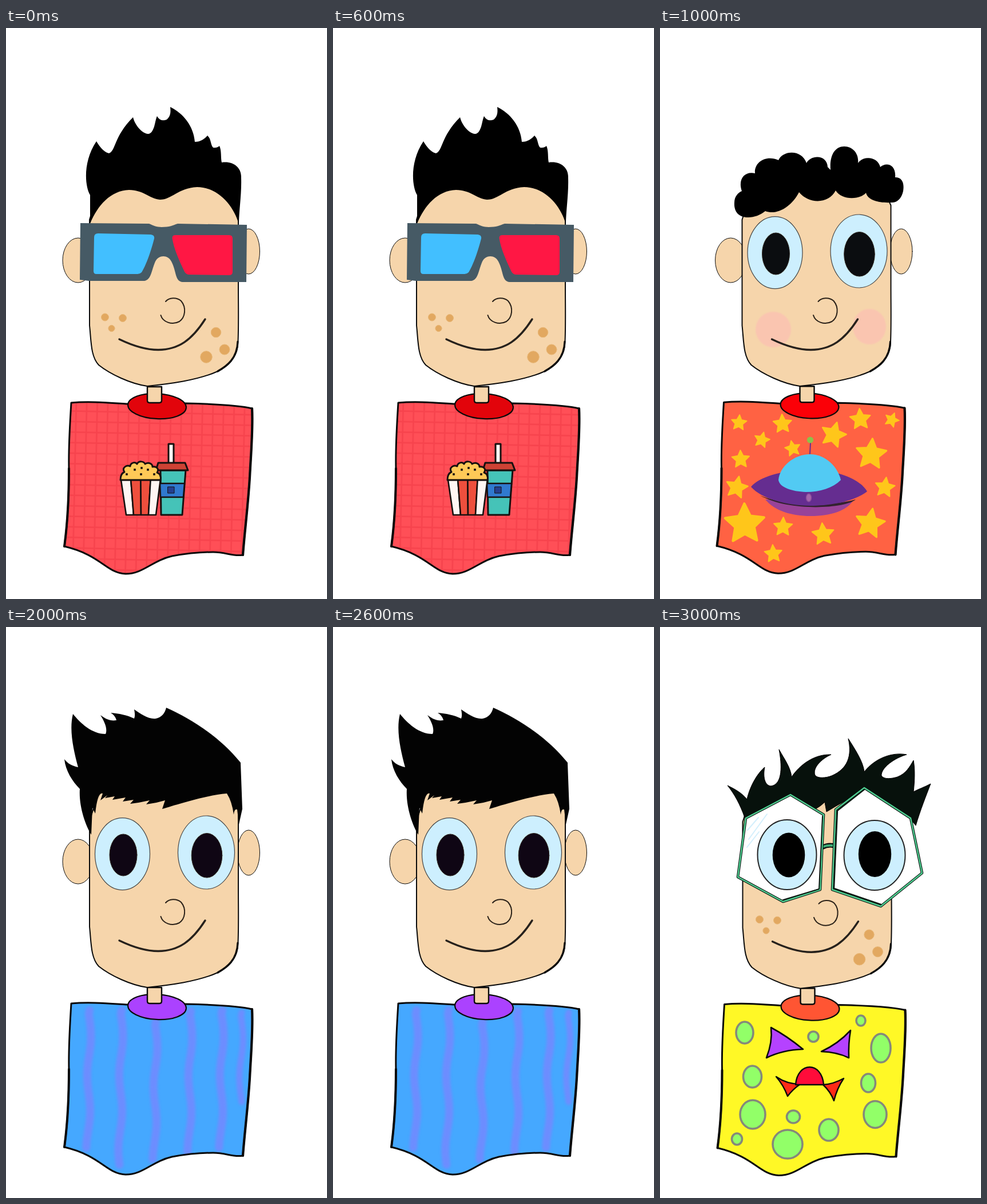
Recreate the animation shown at these times as an HTML page. Size 561 by 998 pixels, loop 4 s.

```html
<!DOCTYPE html>
<html lang="en">
<head>
<meta charset="utf-8">
<title>Four looks</title>
<style>
  html, body { margin: 0; width: 100%; height: 100%; overflow: hidden; background: #fff; }
  svg { display: block; width: 100%; height: 100%; }
</style>
</head>
<body>
<svg id="stage" viewBox="0 0 561 998" stroke-linejoin="round" stroke-linecap="round"></svg>
<script>
const STEP = 1000;
const SKIN = '#f6d5ab', INK = '#0a0a0a';

const path = (d, fill, stroke = 'none', w = 1) =>
  `<path d="${d}" fill="${fill}" stroke="${stroke}" stroke-width="${w}"/>`;
const oval = (x, y, rx, ry, fill, stroke = 'none', w = 1) =>
  `<ellipse cx="${x}" cy="${y}" rx="${rx}" ry="${ry}" fill="${fill}" stroke="${stroke}" stroke-width="${w}"/>`;
const move = (x, y, body) => `<g transform="translate(${x} ${y})">${body}</g>`;

const SHIRT = 'M114 655C145 652 180 655 213 657L315 656C355 657 405 659 430 665' +
  'C432 700 428 745 426 785C423 835 417 880 414 921C396 924 385 916 362 916C338 916 312 919 290 923' +
  'C255 931 240 954 209 954C176 953 166 921 102 906C108 862 110 815 110 770C109 730 112 690 114 655Z';
const HEAD = 'M146 335L165 275H390L406 310V450C406 490 407 530 405 556C402 580 385 592 370 600' +
  'C335 616 285 622 247 626C218 622 182 605 162 589C148 574 149 548 146 520Z';

function star(x, y, r, turn) {
  const pts = Array.from({ length: 10 }, (_, i) => {
    const a = (turn - 90 + i * 36) * Math.PI / 180, k = (i % 2 ? 0.46 : 0.94) * r;
    return (x + k * Math.cos(a)).toFixed(1) + ' ' + (y + k * Math.sin(a)).toFixed(1);
  });
  return path('M' + pts.join('L') + 'Z', '#ffc61a', '#ffc61a', r / 9);
}

const eyes = pupil =>
  oval(203.5, 392.6, 48, 63, '#cdeffe', '#444', 1.2) + oval(205, 394.5, 24, 36.5, pupil, '#332a22', 1) +
  oval(350, 390, 49.5, 64, '#cdeffe', '#444', 1.2) + oval(351, 395.3, 26.8, 38.8, pupil, '#332a22', 1);

const freckles = dx =>
  [[173 + dx, 505.5, 6.5], [204 + dx, 507, 6.5], [184.5 + dx, 525, 5.6], [367, 532, 8.7], [382, 562, 9], [350, 575, 10.3]]
    .map(([x, y, r]) => oval(x, y, r, r, '#e2a860', '#e8b675', 1)).join('');

const cheeks = `<g filter="url(#soft)">${oval(200.5, 527, 31, 31, '#fac5b0')}${oval(368.5, 522, 29, 31, '#fac5b0')}</g>`;

const ears = oval(126, 406, 27, 39, SKIN, INK, 1) + oval(424, 390.5, 19.5, 39.5, SKIN, INK, 1);

const features =
  path('M279 478C285 471 298 470 306 477C316 489 313 506 303 513C290 520 274 514 270.5 502', 'none', '#2a2118', 2) +
  path('M198 544C225 557 245 562.5 266 562.5C302 562 325 545 348 509', 'none', '#26211c', 3.4);

const neck = path('M247 627H272V651Q272 655 268 655H251Q247 655 247 651Z', SKIN, INK, 2.4);

// Popcorn tub and drink
function snack() {
  const tub = [0, 1, 2, 3].map(i => {
    const t = 201 + i * 17.2, b = 210 + i * 13;
    return path(`M${t} 790H${t + 17.2}L${b + 13} 851H${b}Z`, i % 3 ? '#ee4f3d' : '#fff6f4', '#17100f', 2.6);
  }).join('');
  const bits = [[211, 780], [225, 772], [236, 780], [237, 769], [248, 772], [259, 780]]
    .map(([x, y]) => `<rect x="${x - 1.8}" y="${y - 1.8}" width="3.6" height="3.6" fill="#17100f"/>`).join('');
  return path('M284 760V727H293V760', '#fff6f4', '#17100f', 3) +
    path('M270 773H314L308 851H271Z', '#45c3b8', '#17100f', 3) +
    path('M269 796H312L310 820H270Z', '#3079cf', '#17100f', 2.6) +
    `<rect x="283" y="802" width="11" height="11" fill="#243f8f" stroke="#17100f"/>` +
    path('M266 760H313L318 773H262Z', '#cf4234', '#17100f', 3) + tub +
    path('M200 790C200 782 202 778 207 776C202 769 210 763 217 766C218 759 226 758 229 762' +
      'C232 756 241 757 243 762C250 758 256 762 256 767C264 766 268 771 264 777C270 779 271 785 270 790Z',
      '#ffc957', '#17100f', 3) + bits;
}

const grid = '<rect x="90" y="640" width="350" height="330" fill="url(#grid)"/>';

const saucer =
  path('M184 824C200 844 230 853 263 853C300 853 325 843 336 828Z', '#984399') +
  path('M175 817C220 836 300 836 342 824C325 840 225 846 175 817Z', '#33222f') +
  path('M159 802C175 782 225 771 262 774C310 771 350 789 362 810C340 827 300 835 262 835C220 834 178 823 159 802Z', '#652d90') +
  path('M207 790C209 766 235 745 262 745C290 745 311 768 316 790C302 804 280 811 255 811C230 810 209 803 207 790Z', '#52caf3') +
  path('M262 744L263 725', 'none', '#652d90', 2) + oval(262.5, 720, 5.6, 5.6, '#8bc34a') +
  oval(260, 821, 4.5, 7, '#a566ab', '#8a4d9b', 1.5);

const starry = [
  [138, 690, 15, 5], [214, 692, 18, -3], [178, 720, 15, 14], [232, 735, 15, -12], [303, 711, 24, 16],
  [350, 684, 20, -4], [405, 685, 14, 22], [369, 745, 29, 5], [141, 754, 17, -2], [134, 803, 21, 12],
  [393, 803, 19, 8], [148, 867, 38, -1], [215, 872, 18, 2], [285, 885, 21, -5], [367, 866, 28, 10], [198, 919, 17, -4]
].map(s => star(...s)).join('');

const stripes = `<g filter="url(#blur)" opacity=".75">` +
  [[146, 670, 912], [202, 670, 940], [262, 690, 930], [323, 672, 922], [378, 670, 914], [412, 674, 830]]
    .map(([x, a, b]) => {
      let d = `M${x} ${a}`;
      for (let y = a + 6; y <= b; y += 6)
        d += `L${(x - (y - a) / 90 + 3 * Math.sin((y - a) / 20.7 - 0.7)).toFixed(1)} ${y}`;
      return path(d, 'none', '#7a85ff', x > 400 ? 11 : 14);
    }).join('') + '</g>';

const spots = [
  [148, 709, 15, 19], [268, 716, 9, 9], [351, 688, 8, 9], [386, 736, 17, 25], [161.5, 786, 16, 19],
  [364, 797, 12.5, 16], [162, 852, 22, 25], [376, 852, 20, 23.5], [233, 856, 11.5, 11],
  [134.5, 895, 9, 10], [295, 879, 17, 19], [223, 904, 26, 25]
].map(s => oval(...s, '#92ff68', '#85897a', 3.6)).join('');

const monster =
  path('M194 700Q222 715 250 738Q215 739 186 753Q197 725 194 700Z', '#b542ff', INK, 2.6) +
  path('M333 705Q312 728 282 742Q310 743 330 753Q329 728 333 705Z', '#b542ff', INK, 2.6) +
  path('M203 786Q222 799 245 799Q232 808 223 820Q216 801 203 786Z', '#ff2a17', INK, 2.4) +
  path('M321 789Q303 799 285 800Q298 812 304 828Q309 807 321 789Z', '#ff2a17', INK, 2.4) +
  path('M237 800C240 759 283 759 286 800Z', '#ff0c3a', INK, 2.4);

const spiky = path('M147 342L147 292C137 275 135 232 158 198C164 208 171 217 180 219C192 215 188 190 222 156' +
  'C226 172 240 186 250 185C260 181 260 163 264 154C269 163 276 162 281 160C288 154 288 146 287 138' +
  'C310 149 328 172 330 199C340 199 347 194 352 188C359 194 357 204 362 209C367 210 371 208 373 206' +
  'C377 215 375 226 377 235C396 232 412 243 411 262C412 290 407 320 407 343C398 310 370 278 334 278' +
  'C300 280 290 300 269 300C250 298 240 283 215 283C183 284 160 310 147 342Z', '#000');

const curly = path('M154 331C135 331 129 318 130 305C130 295 136 288 143 285C136 265 147 250 166 254' +
  'C164 235 185 221 207 231C215 213 248 212 256 236C264 221 292 221 293 243L298 248C296 222 306 207 322 207' +
  'C338 207 348 221 346 236C355 223 380 224 385 243C395 234 413 238 411 261C424 261 427 272 425 285' +
  'C422 300 412 306 404 305C385 306 363 302 360 288C350 300 318 302 307 284C295 308 260 308 243 287' +
  'C230 312 205 328 184 320C175 327 165 331 154 331Z', '#000');

const swept = path('M149 363C138 345 127 312 129 283C116 270 104 251 102 231C108 239 116 243 126 245' +
  'C118 215 110 180 117 152C130 168 150 187 174 187C178 178 172 165 165 154C173 160 182 165 193 163' +
  'C192 158 188 153 183 150C197 151 212 154 224 160C226 155 225 150 224 144C235 152 250 162 262 160' +
  'C272 158 278 150 280 141C322 160 372 190 410 237L413 318L407 345L404 319Q399 317 398 328Q395 305 386 291' +
  'C350 294 300 310 273 318L278 303Q262 308 245 310L251 303Q234 307 217 309L223 302L204 305L209 298' +
  'L186 302L190 296L173 299L177 294L165 303L169 291Q160 288 156 326L151 316Z', '#030303');

const flames = path('M148 333C140 310 130 292 118 277C130 283 142 289 152 301C158 275 172 254 183 245' +
  'C180 260 182 277 194 278C215 275 213 240 208 214C218 232 228 245 230 262C245 240 270 222 299 223' +
  'C283 230 266 246 271 259C275 265 290 264 300 260C328 248 336 225 329 195C341 214 355 235 357 253' +
  'C375 230 405 218 431 223C410 229 386 246 387 260C392 267 405 265 415 262C430 256 436 245 443 233' +
  'C446 250 445 270 443 288C452 283 462 280 473 274C465 295 455 320 447 347L438 336L357 285L306 314' +
  'L291 323L288 306Q281 313 272 318L228 293Z', '#07110c', '#000', 1);

const shades = path('M130 341L250 342C257 345 263 348 272 348C286 348 291 345 300 342L421 344L420 444L308 444' +
  'C295 442 298 425 289 408C283 396 267 396 261 408C254 424 254 440 242 442L145 442L129 440Z', '#465a65') +
  path('M161 359L253 361Q260 362 259 368C253 392 244 416 237 427Q234 430 230 430H158Q153 430 153 425L154 366Q154 359 161 359Z', '#42bfff') +
  path('M296 362H390Q396 362 396 368V426Q396 432 390 432L320 431Q315 431 312 426C302 405 294 387 291 370Q289 362 296 362Z', '#ff1744');

const lens = d => path(d, '#fff', '#07150f', 4.6) + path(d, 'none', '#50cf92', 2.4);

const specs =
  path('M284 385Q293 380 303 382', 'none', INK, 8) + path('M285 384Q293 381 302 382', 'none', '#3fae78', 4) +
  lens('M228 293L286 328L280 459L215 480L136 437L150 334Z') +
  path('M284 331L278 458L215 477', 'none', '#0c1a13', 2) +
  lens('M357 281L438 334L458 430L386 488L301 459L307 319Z') +
  path('M386 485L304 457L310 321L357 284', 'none', '#0c1a13', 2.4) +
  path('M153 355L172 333M155 371L187 327M152 385L173 358', 'none', '#d3effc', 2) +
  oval(222, 398, 51.5, 61, '#cdeffe', '#222', 2) + oval(225, 398.5, 28.3, 39, '#000') +
  oval(375, 399, 53.5, 61, '#cdeffe', '#222', 2) + oval(375.5, 397, 28.7, 40, '#000');

const looks = [
  { face: [0, 0], body: [0, 0], cloth: '#ff4f57', collar: '#e2040b', print: grid + snack(),
    ears, skin: freckles(0), top: spiky + shades },
  { face: [-2.5, 0], body: [-2.5, -0.7], cloth: '#ff6243', collar: '#fb0007', print: starry + saucer,
    ears, skin: cheeks + eyes('#0b0d10'), top: curly },
  { face: [0, 4], body: [0, 3], cloth: '#45a8ff', collar: '#ab42ff', print: stripes,
    ears, skin: eyes('#0f0614'), top: swept },
  { face: [-1.5, 5.7], body: [-1.5, 4.5], cloth: '#fff826', collar: '#ff5533', print: spots + monster,
    ears: '', skin: freckles(2.5), top: flames + specs }
];

function draw(k) {
  const [bx, by] = k.body;
  const shirt = path(SHIRT, k.cloth) +
    `<g clip-path="url(#shirt)">${move(-bx, -by, k.print)}</g>` +
    path(SHIRT, 'none', INK, 3) +
    path('M430 665C432 700 428 745 426 785C423 835 417 880 414 921', 'none', INK, 4.2) +
    path('M102 906C108 862 110 815 110 770', 'none', INK, 4) +
    `<g transform="rotate(3 264 661)">${oval(264, 661, 51, 22, k.collar, INK, 2.2)}</g>` + neck;
  const face = k.ears + path(HEAD, SKIN, INK, 2) +
    path('M405 548C404 578 386 591 370 600', 'none', INK, 3.2) + k.skin + features;
  return move(bx, by, shirt) + move(...k.face, face) + k.top;
}

const stage = document.getElementById('stage');
stage.innerHTML = `<defs>
  <clipPath id="shirt"><path d="${SHIRT}"/></clipPath>
  <pattern id="grid" width="18.4" height="18.4" patternUnits="userSpaceOnUse" patternTransform="translate(121 668) rotate(1.2)">
    <path d="M0 1.5H18.4M1.5 0V18.4" stroke="#f7434d" stroke-width="2.6"/></pattern>
  <filter id="soft"><feGaussianBlur stdDeviation="1.2"/></filter>
  <filter id="blur" x="-10%" width="120%"><feGaussianBlur stdDeviation="2.2"/></filter>
</defs>` + looks.map(k => `<g class="look" opacity="0">${draw(k)}</g>`).join('');

const total = STEP * looks.length;
const start = document.timeline.currentTime || 0;
stage.querySelectorAll('.look').forEach((g, i) => {
  const anim = g.animate([
    { opacity: 1, offset: 0, easing: 'step-end' },
    { opacity: 0, offset: 1 / looks.length, easing: 'step-end' },
    { opacity: 0, offset: 1 }
  ], { duration: total, iterations: Infinity, delay: i ? i * STEP - total : 0 });
  anim.startTime = start;
});
</script>
</body>
</html>
```
